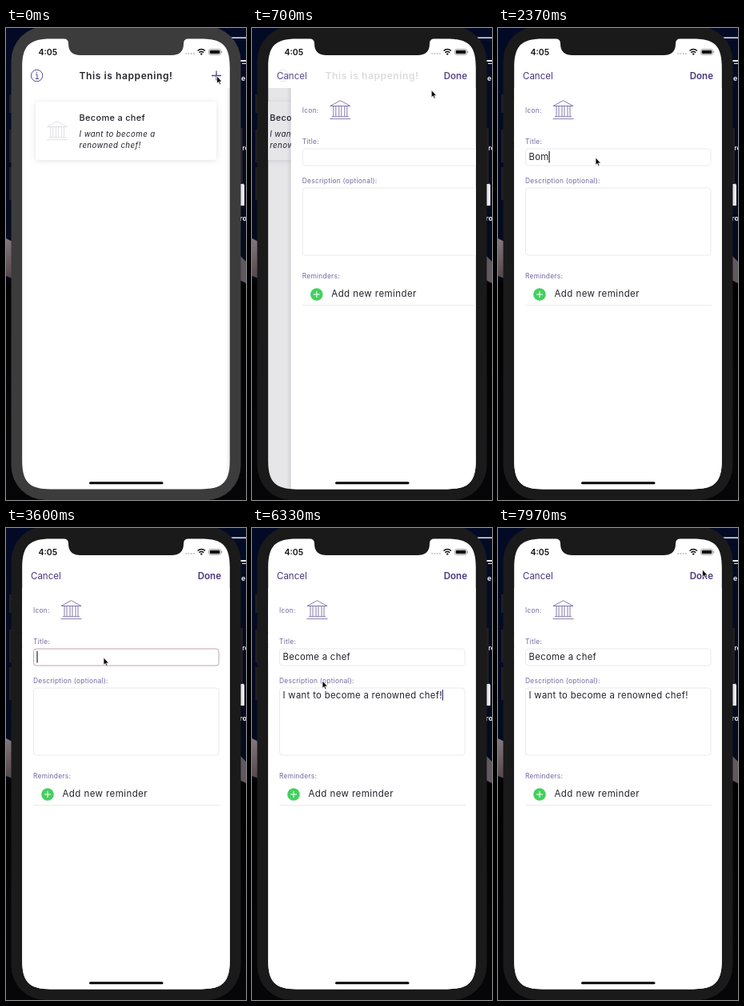
An HTML page that plays this animation: 300x590 px, repeating every 8 s.

```html
<!DOCTYPE html>
<html lang="en">
<head>
<meta charset="utf-8">
<title>Goal form</title>
<style>
html, body { margin: 0; width: 100%; height: 100%; overflow: hidden; background: #02040c; }
svg { display: block; width: 300px; height: 590px; font-family: Inter, Roboto, sans-serif; }
text { white-space: pre; }
.label { font-size: 8.4px; letter-spacing: .26px; fill: #74669f; }
.entry { font-size: 11.3px; letter-spacing: .33px; fill: #24222c; }
.row { font-size: 11.5px; letter-spacing: .42px; fill: #24222c; }
.card { font-size: 11px; letter-spacing: .3px; font-weight: 500; fill: #24222c; }
.note { font-size: 9.7px; letter-spacing: .4px; font-style: italic; fill: #24222c; }
.title { font-size: 12.1px; letter-spacing: .55px; font-weight: 600; fill: #27252f; }
.nav { font-size: 11.5px; fill: #49347f; }
.field { fill: #fff; stroke: #eaeaee; }
.line { fill: none; stroke: #55448c; }
.caret { stroke: #25232d; stroke-width: 1.2; }
</style>
</head>
<body>
<svg viewBox="0 0 300 590">
  <defs>
    <linearGradient id="sky" x2="0" y2="1">
      <stop offset="0" stop-color="#030a25"/><stop offset=".52" stop-color="#050a1c"/>
      <stop offset=".54" stop-color="#020203"/><stop offset="1" stop-color="#060609"/>
    </linearGradient>
    <linearGradient id="haze" x2="0" y2="1">
      <stop offset="0" stop-color="#81777d"/><stop offset="1" stop-color="#55474b"/>
    </linearGradient>
    <filter id="soft" x="-20%" y="-30%" width="140%" height="160%">
      <feDropShadow dx="0" dy="1" stdDeviation="3" flood-color="#667" flood-opacity=".2"/>
    </filter>
    <filter id="edge" x="-10%" width="120%">
      <feDropShadow dx="-1" dy="0" stdDeviation="2.5" flood-opacity=".16"/>
    </filter>
    <clipPath id="screen">
      <path d="M56 13.600H72Q78 13.600 78 19.500Q78 34 93 34H207Q222 34 222 19.500Q222 13.600 228 13.600H244C271 13.600 279.800 22.500 279.800 49.500V540.500C279.800 567.500 271 576.400 244 576.400H56C29 576.400 20.200 567.500 20.200 540.500V49.500C20.200 22.500 29 13.600 56 13.600Z"/>
    </clipPath>
    <clipPath id="below"><rect x="20" y="75" width="260" height="502"/></clipPath>
    <g id="bank" fill="none" stroke-width=".75">
      <path d="M.5 7.5L13 .7L25.500 7.500ZM4.500 7.500V20.500M7.500 7.500V20.500M11.500 7.500V20.500M14.500 7.500V20.500M18.500 7.500V20.500M21.500 7.500V20.500M2.500 20.800H23.500M0 23.600H26"/>
    </g>
  </defs>

  <rect width="300" height="590" fill="url(#sky)"/>
  <path d="M0 263L8 267V313L0 310Z" fill="url(#haze)"/>
  <path d="M292 284L300 292V319L292 315Z" fill="#625960"/>
  <g fill="#e8e8ee" font-size="9" font-weight="700">
    <path d="M280 11.500H300V13H280ZM293 40H300V42H293ZM295 44H300V45H295ZM292 190L298 196V222H292Z"/>
    <text x="294" y="66">e</text><text x="295" y="153">ro</text><text x="292" y="241">ro</text>
  </g>
  <path d="M4 83H8V106H4ZM4 127H8V168H4ZM4 174H8V215H4ZM292 125H296V195H292Z" fill="#202022"/>
  <rect id="body" x="6.500" y="-2" width="287" height="592" rx="43"/>

  <g clip-path="url(#screen)">
    <rect x="20" y="13" width="260" height="565" fill="#fff"/>
    <g clip-path="url(#below)">
      <g id="list">
        <rect x="37" y="92" width="226" height="73" rx="4" fill="#fff" filter="url(#soft)"/>
        <use href="#bank" x="51" y="116" stroke="#d5d5de"/>
        <text class="card" x="91.500" y="115.500">Become a chef</text>
        <text class="note" x="91.500" y="136">I want to become a</text>
        <text class="note" x="91.500" y="149.500">renowned chef!</text>
      </g>
      <rect id="dim" x="20" y="75" width="260" height="502" fill="#080820"/>
      <g id="form">
        <rect x="20" y="70" width="270" height="515" fill="#fff" filter="url(#edge)"/>
        <text class="label" x="34" y="105.500">Icon:</text>
        <use href="#bank" x="68.500" y="90" stroke="#5f4f92"/>
        <text class="label" x="34" y="145.200">Title:</text>
        <rect id="titleBox" class="field" x="34.500" y="151" width="231.500" height="21" rx="3.500"/>
        <text id="titleText" class="entry" x="38.500" y="165.300"></text>
        <path id="titleCaret" class="caret" d="M0 154V168.500"/>
        <text class="label" x="34" y="194">Description (optional):</text>
        <rect class="field" x="34.500" y="200" width="231.500" height="84" rx="3.500"/>
        <text id="noteText" class="entry" x="38.500" y="213"></text>
        <path id="noteCaret" class="caret" style="stroke:#40327c" d="M0 202V215.500"/>
        <text class="label" x="34" y="313">Reminders:</text>
        <circle cx="52" cy="333" r="7.800" fill="#43d05e"/>
        <path d="M48 333H56M52 329V337" stroke="#fff" stroke-width="1.100"/>
        <text class="row" x="70.500" y="336.300">Add new reminder</text>
        <path d="M34 346.500H267" stroke="#ebebef"/>
      </g>
    </g>

    <g id="listNav">
      <circle class="line" cx="38.600" cy="59.500" r="7.200"/>
      <path class="line" d="M37 58H39V63.500M36.800 63.500H41M38.500 55V56.300"/>
      <text class="title" x="91.500" y="64">This is happening!</text>
    </g>
    <path id="plus" class="line" stroke-width="1.300" d="M257 59.500H269M263 53.500V65.500"/>
    <g id="formNav">
      <text class="nav" x="31" y="64">Cancel</text>
      <text class="nav" x="239.800" y="64" font-weight="600">Done</text>
    </g>

    <text x="40.500" y="33.500" font-size="10.500" font-weight="600" fill="#111">4:05</text>
    <g fill="#c4c4c8">
      <circle cx="225.300" cy="32" r="1.100"/><circle cx="228.500" cy="32" r="1.100"/>
      <circle cx="231.700" cy="32" r="1.100"/><circle cx="234.900" cy="32" r="1.100"/>
    </g>
    <path d="M239.500 28.500Q244.200 24.500 249 28.500M241.300 30.700Q244.200 28.300 247.200 30.700" fill="none" stroke="#111" stroke-width="1.500"/>
    <path d="M242.700 32.200Q244.200 31 245.800 32.200L244.200 34Z" fill="#111"/>
    <rect x="253.500" y="26.500" width="15" height="7" rx="2" fill="none" stroke="#999" stroke-width=".8"/>
    <rect x="254.700" y="27.700" width="12.600" height="4.600" rx="1" fill="#111"/>
    <path d="M269.700 28.800V31.200" stroke="#999"/>
    <rect x="104" y="567.300" width="92.500" height="3" rx="1.500" fill="#080808"/>
  </g>
  <path id="pointer" d="M0 0V9.300L2.100 7.400L3.500 10.700L5 10L3.600 6.900H6.500Z" fill="#0a0a0a" stroke="#fff" stroke-width=".7"/>
</svg>
<script>
const LOOP = 8000;
const el = id => document.getElementById(id);
const clamp = v => Math.max(0, Math.min(1, v));
const ramp = (t, from, to) => clamp((t - from) / (to - from));
const smooth = v => v * v * (3 - 2 * v);

// Pointer stops: time, x, y
const stops = [
  [0, 263.5, 60], [300, 263.5, 60], [600, 253.5, 62], [900, 142.5, 121],
  [1130, 122, 158], [1300, 122, 162], [3700, 122, 162], [4400, 105, 178],
  [5400, 105, 178], [5800, 84, 206], [6130, 88, 191], [6600, 88, 191],
  [7000, 115, 180], [7750, 246, 56], [7970, 255.5, 52]
];

function pointerAt(t) {
  const i = stops.findIndex(s => s[0] > t);
  if (i < 0) return stops.at(-1).slice(1);
  const [a, b] = [stops[i - 1], stops[i]];
  const k = smooth(ramp(t, a[0], b[0]));
  return [a[1] + (b[1] - a[1]) * k, a[2] + (b[2] - a[2]) * k];
}

function titleAt(t) {
  if (t < 2800) return "Bomece".slice(0, clamp((t - 1870) / 930) * 6.2);
  if (t < 3600) return "Bomece".slice(0, Math.ceil(6 * (1 - ramp(t, 2850, 3480))));
  if (t < 4300) return "";
  return "Become a chef".slice(0, 1 + 12 * ramp(t, 4440, 5230));
}

// A critically damped spring drives the push transition.
function pushAt(t) {
  const s = Math.max(0, t - 512) * .0199;
  return t > 1050 ? 1 : 1 - (1 + s) * Math.exp(-s);
}

function setEntry(name, value, focused) {
  const text = el(name + "Text"), caret = el(name + "Caret");
  if (text.textContent !== value) text.textContent = value;
  const end = value ? text.getComputedTextLength() : 0;
  caret.setAttribute("transform", `translate(${39 + end} 0)`);
  caret.setAttribute("visibility", focused ? "visible" : "hidden");
}

function draw(t) {
  const p = pushAt(t);
  el("body").setAttribute("fill", t < 300 ? "#3c3c3d" : "#1a1a1b");
  el("list").setAttribute("transform", `translate(${-78 * p} 0)`);
  el("form").setAttribute("transform", `translate(${260 * (1 - p)} 0)`);
  el("dim").setAttribute("opacity", .11 * p);
  el("listNav").setAttribute("opacity", clamp(1.4 * (1 - p)));
  el("plus").setAttribute("opacity", (t < 30 ? 1 : .7) * (1 - p));
  el("formNav").setAttribute("opacity", p);

  setEntry("title", titleAt(t), t > 1300 && t < 5600);
  setEntry("note", t < 6300 ? "" : "I want to become a renowned chef!",
    t >= 5600 && (t < 6000 || (t - 6000) % 1000 < 500));

  const alert = ramp(t, 3450, 3580) * (1 - ramp(t, 4250, 4400));
  const mix = (a, b) => Math.round(a + (b - a) * alert);
  el("titleBox").style.stroke = `rgb(${mix(234, 196)},${mix(234, 164)},${mix(238, 170)})`;
  el("pointer").setAttribute("transform", `translate(${pointerAt(t)})`);
}

const start = performance.now();
function frame() {
  draw((performance.now() - start) % LOOP);
  requestAnimationFrame(frame);
}
frame();
</script>
</body>
</html>
```
